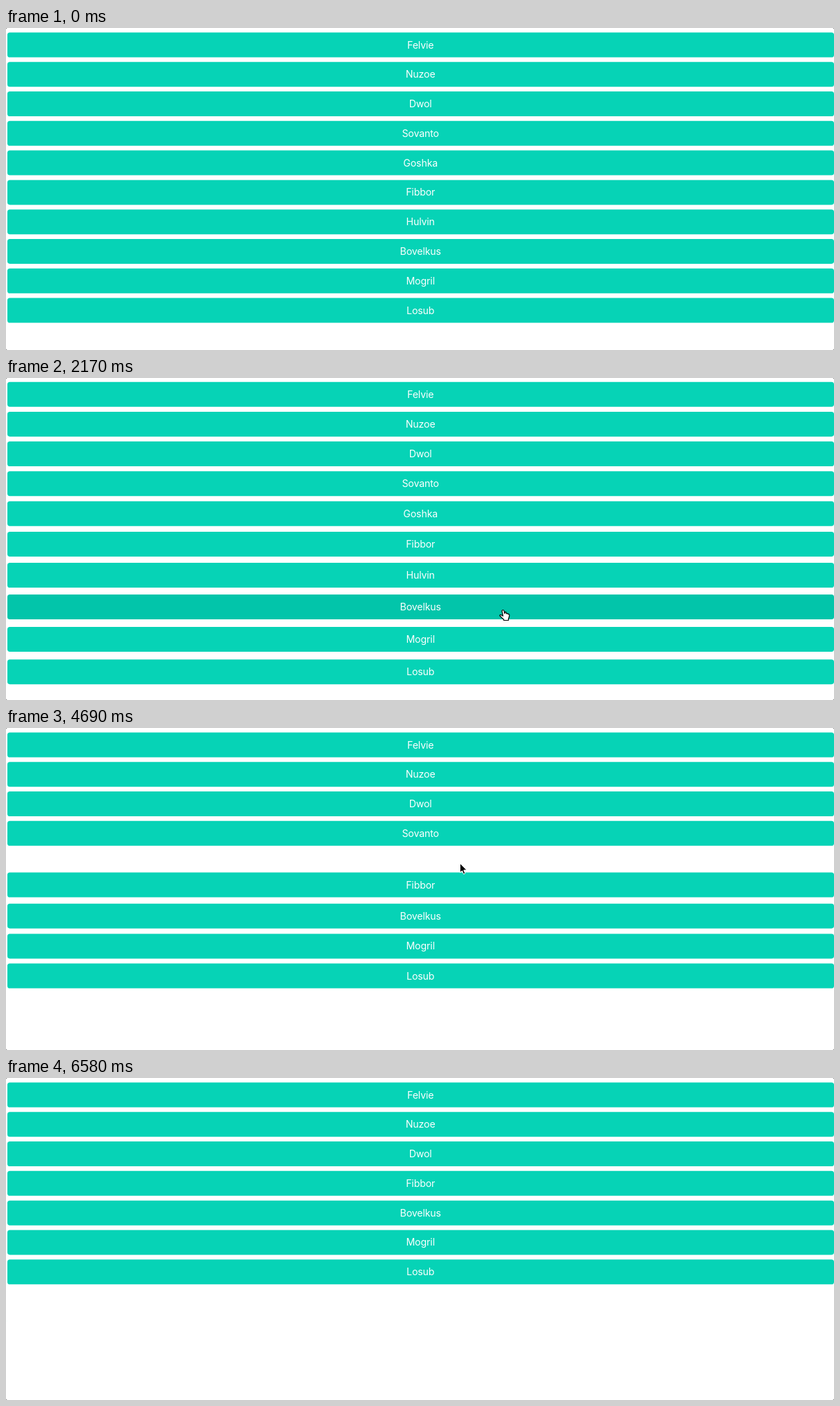
Animation, 1199 px wide and 467 px high, one loop 6.65 s. Source, as an HTML page:

```html
<!DOCTYPE html>
<html lang="en">
<head>
<meta charset="utf-8">
<title>Staggered list</title>
<style>
  html, body { margin: 0; width: 100%; height: 100%; overflow: hidden; background: #555; }
  #stage { position: relative; width: 100%; height: 100%; overflow: hidden; background: #fff; border-radius: 2px; }
  .row {
    position: absolute; left: 1.8px; top: 0; width: 1196.8px; height: 35.5px;
    border-radius: 3.6px; background: #06d3b6; color: #fff;
    font: 14.2px/35.5px Inter, sans-serif; letter-spacing: -.15px; text-align: center;
  }
  .row.hover { background: #02c5aa; }
  .row.press { background: #01b89d; }
  #pointer { position: absolute; left: 0; top: 0; width: 1px; height: 1px; overflow: visible; }
  #pointer path { stroke-linejoin: round; stroke-linecap: round; }
  #arrow { fill: #000; stroke: #fff; stroke-width: 1; }
  #hand { fill: #fff; stroke: #000; stroke-width: 1.2; }
</style>
</head>
<body>
<div id="stage">
  <svg id="pointer">
    <path id="arrow" d="M0 0V13.2L3 10.5L5.1 15.4L7.4 14.4L5.3 9.6H9.4Z"/>
    <path id="hand" d="M-1.8 1.4C-1.6-.4.8-.4 1.1 1.2L2.2 5.2C3-.1 4.6 4.3 4.9 5.5C5.5 4.5 7 4.9 7.1 6.1C8.2 5.5 9 6.3 8.9 7.6C9 10 8.2 11.6 7.5 13V15H.8V13.8C-1 12.5-2.5 10.6-4.6 8.8C-5.6 7.6-4.3 6.5-3 7.2L-.3 8.6Z"/>
  </svg>
</div>
<script>
const LOOP = 6650, STEP = 70;
const TOP = 6.5, PITCH = 42.78, HEIGHT = 35.5;
const LAG = 66; // delay passed from each row to the next

const names = ["Felvie", "Nuzoe", "Dwol", "Sovanto", "Goshka", "Fibbor", "Hulvin", "Bovelkus", "Mogril", "Losub"];

// at: layout change, start: trail begins, slot: first row that slides
const events = [
  { at: 1540, start: 1515, slot: 0 },
  { at: 3080, start: 2945, slot: 6, removes: 6 },
  { at: 4550, start: 4530, slot: 4, removes: 4 },
  { at: 5460, start: 5465, slot: 3, removes: 3 }
];

// time, x, y
const path = [
  [280, 734, 431], [560, 720, 336.5], [2170, 720, 336.5], [2730, 679.5, 271],
  [3500, 679.5, 271], [3850, 660, 229], [3920, 659.5, 217.5], [4130, 657.5, 196.5],
  [4900, 657.5, 196.5], [5250, 664.5, 157], [5880, 664.5, 157], [6440, 690, 240], [6500, 700, 480]
];

const stage = document.getElementById("stage");
const pointer = document.getElementById("pointer");
const arrow = document.getElementById("arrow");
const hand = document.getElementById("hand");

const rows = names.map(name => {
  const el = document.createElement("div");
  el.className = "row";
  el.textContent = name;
  stage.insertBefore(el, pointer);
  return el;
});

// Share of the distance left for row k in a chain of followers
function remaining(k, elapsed) {
  const n = Math.max(0, elapsed) / LAG;
  let term = Math.exp(-n), sum = term;
  for (let i = 1; i <= k; i++) sum += term *= n / i;
  return sum;
}

function overshoot(k, elapsed) {
  const u = Math.max(0, elapsed) / 235;
  return 8.6 * 0.45 ** k * (u * Math.exp(1 - u)) ** 3;
}

function pointerAt(t) {
  const i = path.findIndex(p => p[0] > t);
  if (i < 1) return null;
  const [t0, x0, y0] = path[i - 1], [t1, x1, y1] = path[i];
  const u = (t - t0) / (t1 - t0), e = u * u * (3 - 2 * u);
  return { x: x0 + (x1 - x0) * e, y: y0 + (y1 - y0) * e };
}

function layout(t) {
  const past = events.filter(e => t >= e.at);
  const gone = past.map(e => e.removes);
  let slot = 0;
  return rows.map((el, id) => {
    if (gone.includes(id)) return null;
    const k = slot++;
    let y = TOP + k * PITCH;
    for (const e of past) {
      if (k < e.slot) continue;
      y += 35.7 * remaining(k, t - e.start) - overshoot(k, t - e.start);
    }
    return y;
  });
}

const hit = (ys, p) => p ? ys.findIndex(y => y !== null && p.y >= y && p.y <= y + HEIGHT) : -1;

function draw(t) {
  const ys = layout(t), tip = pointerAt(t);
  const hovered = hit(ys, pointerAt(t - STEP));
  const click = events.find(e => e.removes && t >= e.at - 2 * STEP && t < e.at);

  rows.forEach((el, id) => {
    const y = ys[id];
    el.style.display = y === null ? "none" : "";
    if (y !== null) el.style.transform = `translateY(${y.toFixed(2)}px)`;
    el.classList.toggle("hover", id === hovered);
    el.classList.toggle("press", !!click && id === click.removes);
  });

  pointer.style.display = tip ? "" : "none";
  if (!tip) return;
  const pointing = hit(ys, tip) >= 0 && !(t >= 1330 && t < 1540);
  pointer.style.transform = `translate(${tip.x}px, ${tip.y}px)`;
  arrow.style.display = pointing ? "none" : "";
  hand.style.display = pointing ? "" : "none";
}

const begin = performance.now();
function tick() {
  const t = (performance.now() - begin) % LOOP;
  draw(Math.floor(t / STEP) * STEP);
  requestAnimationFrame(tick);
}
tick();
</script>
</body>
</html>
```
